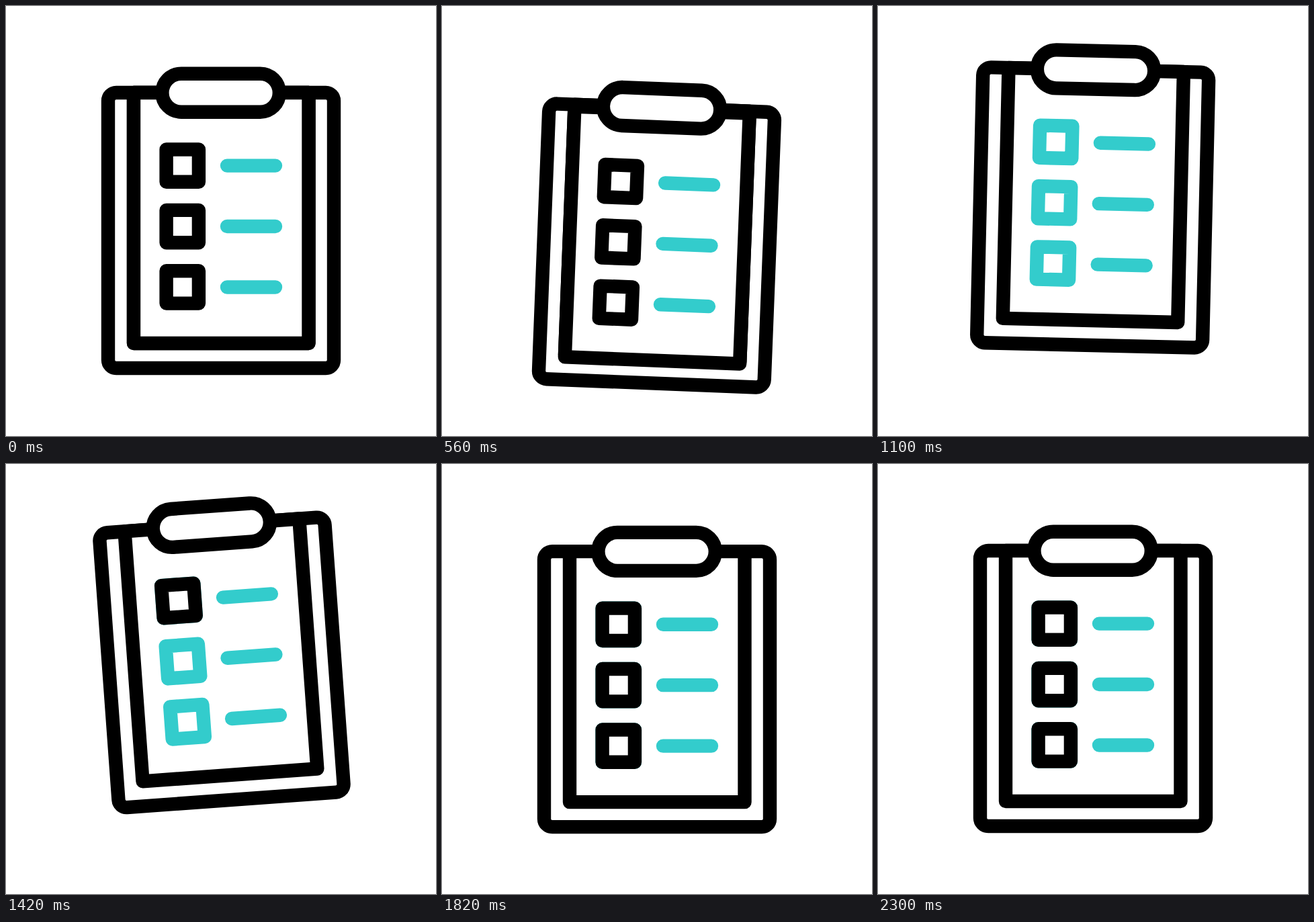
Animation, 640 px wide and 640 px high, one loop 2420 ms. Source, as an HTML page:

```html
<!DOCTYPE html>
<html lang="en">
<head>
<meta charset="utf-8">
<title>Checklist</title>
<style>
  html, body { margin: 0; height: 100%; overflow: hidden; background: #fff; }
  svg { display: block; width: 100%; height: 100%; }
  .ink { fill: #fff; stroke: #000; }
  .teal { fill: #fff; stroke: #3cc; }
</style>
</head>
<body>
<svg viewBox="0 0 640 640" stroke-width="20.4" stroke-linejoin="round" stroke-linecap="round">
  <defs>
    <g id="sheet">
      <path class="ink" d="M190 129H450.5V502H190Z"/>
      <path class="teal" d="M329 237.6h72M329 328h72M329 418.5h72"/>
    </g>
    <path id="box" d="M238.6 213.5h48.3v48.3h-48.3z"/>
  </defs>
  <g id="board">
    <rect class="ink" x="152" y="129" width="336" height="410" rx="12"/>
    <use href="#sheet"/>
    <g id="back"></g>
    <g id="front"><use href="#sheet"/></g>
    <rect class="ink" x="232.4" y="100.7" width="174.4" height="57" rx="28.5"/>
  </g>
</svg>
<script>
const LOOP = 2420;
const $ = id => document.getElementById(id);
const [board, back, front] = ["board", "back", "front"].map($);

// keys: [time, value, slope = 0]
const LIFT = [[220, 0], [520, 24], [780, -11, -0.16], [1100, -34, -0.03],
              [1400, -40], [1640, 25.5], [1970, -17], [2300, 0]];
const TILT = [[460, 0], [745, 7.8], [1420, -4.15], [1700, 0]];

// cubic Hermite interpolation, held flat outside the keys
function track(keys, t) {
  const i = keys.findIndex(k => t < k[0]);
  if (i < 0) return keys[keys.length - 1][1];
  if (i === 0) return keys[0][1];
  const [t0, a, sa = 0] = keys[i - 1], [t1, b, sb = 0] = keys[i];
  const h = t1 - t0, u = (t - t0) / h, v = 1 - u;
  return a * v * v * (1 + 2 * u) + b * u * u * (3 - 2 * u)
       + h * u * v * (sa * v - sb * u);
}

function addBox(parent, row, cls) {
  const el = document.createElementNS("http://www.w3.org/2000/svg", "use");
  el.setAttribute("href", "#box");
  el.setAttribute("y", row * 90.4);
  el.setAttribute("class", cls);
  return parent.appendChild(el);
}

const marks = [0, 1, 2].map(row => {
  addBox(front, row, "ink");
  addBox(back, row, "teal");
  return addBox(back, row, "ink");
});

function draw(now) {
  const t = now % LOOP;
  board.setAttribute("transform",
    `translate(0 ${track(LIFT, t)}) rotate(${track(TILT, t)} 320 320)`);

  // the top sheet falls out, swinging to the left
  const p = Math.max(0, (t - 524) / 256), swing = p ** 4;
  front.setAttribute("transform",
    `translate(${-39 * swing} ${233 * p ** 2.25}) rotate(${3.5 * swing} 320 334)`);
  front.style.display = t < 1000 ? "" : "none";

  // boxes darken one after another
  marks.forEach((mark, row) => {
    const u = (t - 1290 - row * 140) / 130;
    mark.style.opacity = Math.min(1, Math.max(0, u));
  });
  requestAnimationFrame(draw);
}
requestAnimationFrame(draw);
</script>
</body>
</html>
```
